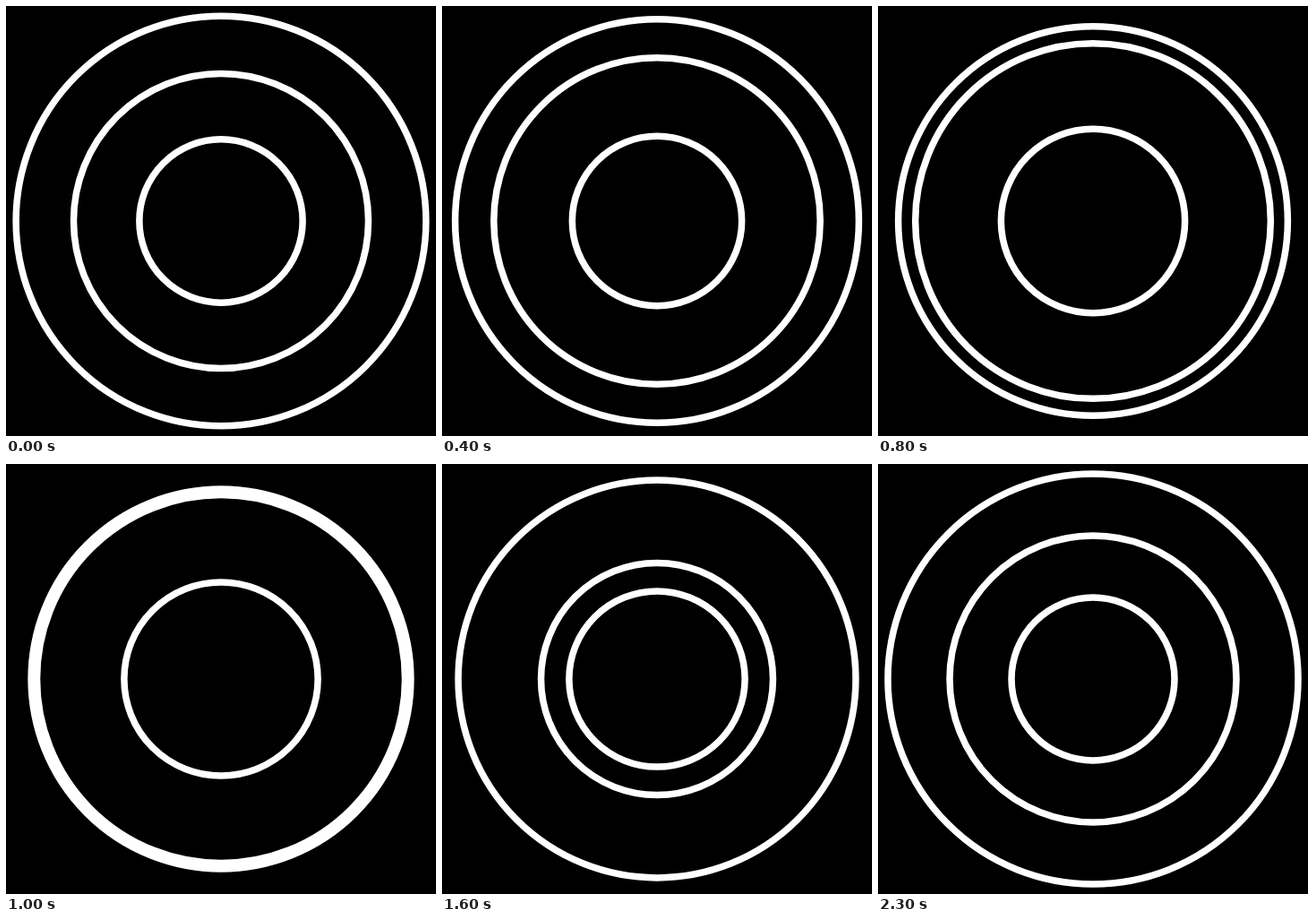
An HTML page that plays this animation: 480 px wide and 480 px high, repeating every 2.4 s.

```html
<!DOCTYPE html>
<html lang="en">
<head>
<meta charset="utf-8">
<title>Rolling rings</title>
<style>
  html, body { margin: 0; width: 100%; height: 100%; overflow: hidden; background: #000; }
  svg { display: block; width: 100vw; height: 100vh; }
  circle { fill: none; stroke: #fff; stroke-width: 7.5; }
</style>
</head>
<body>
<svg viewBox="0 0 480 480">
  <circle cx="240" cy="240"/>
  <circle cx="240" cy="240"/>
  <circle cx="240" cy="240"/>
</svg>
<script>
  const LOOP = 2400, STEP = 100, OFFSET = 1300;
  const MEAN = 160, SWING = 69;
  const rings = document.querySelectorAll('circle');

  // Rings a quarter turn apart roll over the visible side of a torus.
  function draw(time) {
    const held = Math.floor(time / STEP) * STEP;
    const turn = ((held + OFFSET) % LOOP) / LOOP - 0.5;
    rings.forEach((ring, i) => {
      const angle = (turn + i - 1) * Math.PI / 2;
      ring.setAttribute('r', (MEAN + SWING * Math.sin(angle)).toFixed(2));
    });
  }

  function tick() {
    draw(performance.now());
    requestAnimationFrame(tick);
  }

  draw(0);
  requestAnimationFrame(tick);
</script>
</body>
</html>
```
